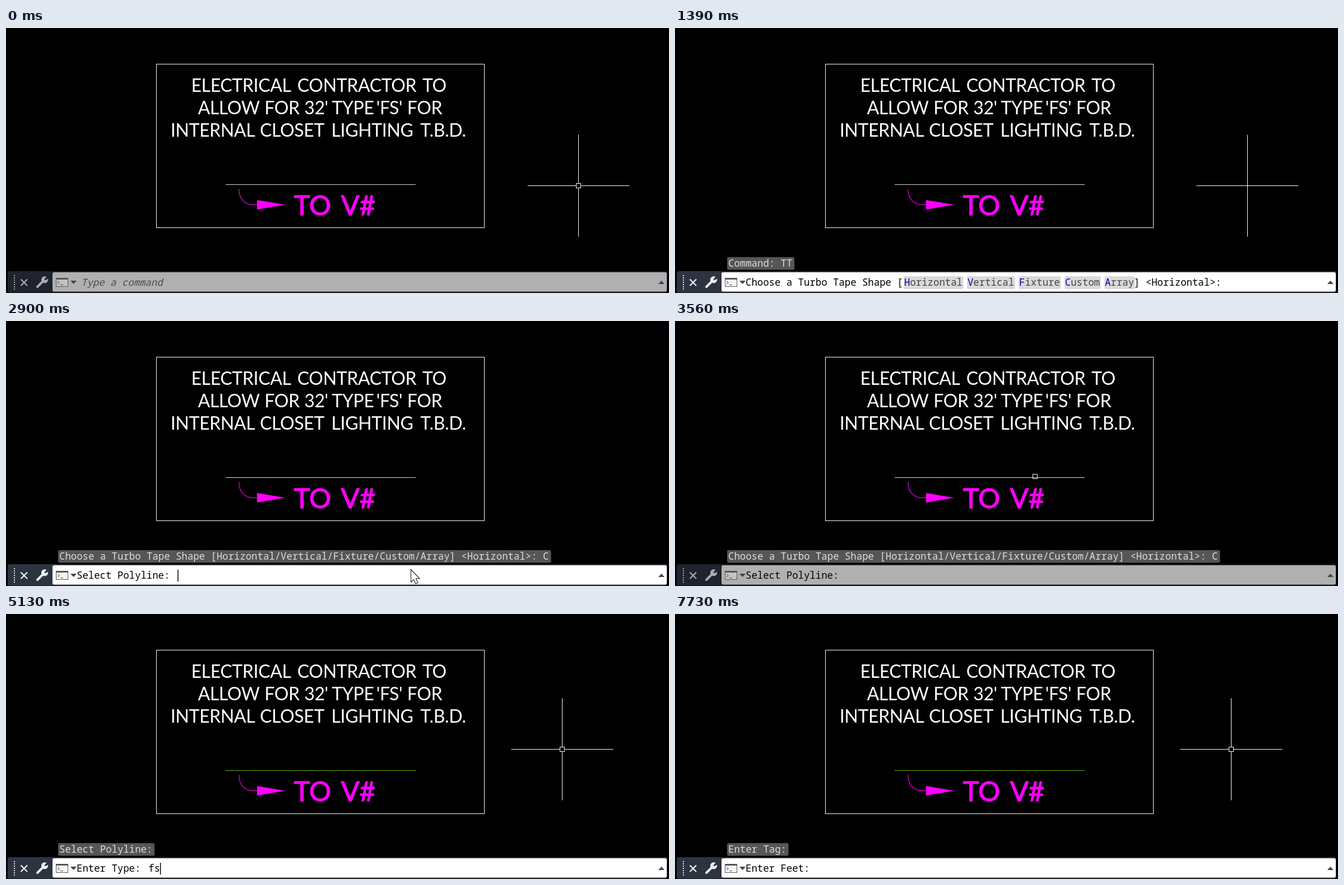
Recreate the animation shown at these times as an HTML page. Size 1183x473 px, loop 8 s.

```html
<!DOCTYPE html>
<html lang="en">
<head>
<meta charset="utf-8">
<title>Command line drawing</title>
<style>
  html, body { margin: 0; width: 100%; height: 100%; overflow: hidden; background: #000; }
  svg { display: block; width: 1183px; height: 473px; }
  .mono { font: 500 17.34px "Noto Sans Mono", monospace; white-space: pre; }
  .hint { font-style: italic; font-weight: 400; }
  .note { font: 32px Lato, sans-serif; letter-spacing: -.35px; fill: #fff; text-anchor: middle; }
  .tag { font: 48.8px Lato, sans-serif; fill: #f0f; stroke: #f0f; stroke-width: 1.3; text-anchor: middle; }
  .thin { fill: none; stroke: #fff; stroke-width: 1; }
  #bar { --frame: #1e232d; --field: #b0b0b0; --glyph: #a9abae; --chip: #959595; --chipText: #333; }
  #bar.active { --frame: #2d3441; --field: #fff; --glyph: #eceef0; --chip: #dadada; --chipText: #444; }
  .frame { fill: var(--frame); }
  .field { fill: var(--field); }
  .glyph { stroke: var(--glyph); fill: none; }
  .hidden { display: none; }
</style>
</head>
<body>
<svg viewBox="0 0 1183 473">
  <rect width="1183" height="473"/>
  <rect class="thin" x="268.5" y="64.5" width="585" height="292"/>
  <g id="notes"></g>
  <path id="polyline" d="M392 279.5H731"/>
  <path d="M416 287V291A24.5 24.5 0 0 0 440.5 315.5H449" fill="none" stroke="#f0f" stroke-width="1.1"/>
  <path d="M448 307L498 315.5L448 324Z" fill="#f0f"/>

  <g id="cross">
    <path id="arms" class="thin"/>
    <rect id="pick" class="thin" x="-4" y="-4" width="8" height="8"/>
  </g>

  <g id="popup">
    <rect x="83" y="366" width="454" height="68" fill="#272d3a"/>
    <rect x="83" y="402" width="454" height="32" fill="#465061"/>
    <path d="M89.5 383.5h4v4h-4zM94 385.5h11M105.5 382.5h6v6h-6z" fill="none" stroke="#d5d8dc"/>
    <text class="mono" x="117.5" y="391.5" fill="#f0f0f0">TT</text>
    <circle cx="489.5" cy="386" r="10.7" fill="#f4f4f4"/>
    <text x="489.5" y="392" text-anchor="middle" font-family="Open Sans, sans-serif" font-weight="700" font-size="17" fill="#272d3a">?</text>
    <g fill="none" stroke="#2c87c9" stroke-width="1.5">
      <circle cx="517" cy="385" r="9.7"/>
      <ellipse cx="517" cy="385" rx="4.6" ry="9.7"/>
      <path d="M517 375V395M507 385H527M509 380H525M509 390H525"/>
    </g>
    <circle cx="522" cy="390" r="4" fill="#272d3a" stroke="#8d949e" stroke-width="1.4"/>
    <path d="M525 393l4 4" stroke="#8d949e" stroke-width="1.8"/>
    <rect x="90" y="406" width="22" height="22" fill="#fff"/>
    <text x="118" y="426" font-family="Noto Sans, sans-serif" font-weight="700" font-size="18.5" fill="#d2d5da">Layer: CDL-A-LTG-ATTRIBUTE</text>
  </g>

  <g id="history">
    <rect id="historyBox" x="93" y="409" height="22.5" rx="3" fill="#565656"/>
    <text id="historyText" class="mono" x="95" y="426" fill="#dcdcdc"></text>
  </g>

  <g id="bar">
    <rect class="frame" x="3" y="434" width="1177" height="38.5" rx="4"/>
    <rect class="field" x="83" y="436" width="1096" height="34.5" rx="3"/>
    <path class="glyph" d="M15 441V467" stroke-width="2" stroke-dasharray="2 2"/>
    <path class="glyph" d="M26.5 448.5L38 460M38 448.5L26.5 460" stroke-width="2.3"/>
    <path class="glyph" d="M56 462L67 451" stroke-width="4" stroke-linecap="round"/>
    <path class="glyph" d="M70.5 444.5A5 5 0 1 0 74 449.5L69.5 451.5L67 448.5Z" stroke-width="2.2" style="fill:var(--glyph)"/>
    <rect x="89.5" y="446.5" width="21" height="15" fill="#e4e4e4" fill-opacity=".35" stroke="#555"/>
    <path d="M89 447.5H111" stroke="#555" stroke-width="3"/>
    <path d="M92 452l3.5 2.5l-3.5 2.5M97 458.5h5" fill="none" stroke="#444"/>
    <path d="M115 451H126L120.5 457Z" fill="#444"/>
    <path d="M1164 457H1175L1169.5 451Z" fill="#444"/>
    <text id="placeholder" class="mono hint" x="134" y="460" fill="#4d4d4d">Type a command</text>
    <text id="prompt" class="mono" x="126" y="460"></text>
    <g id="options"></g>
    <text id="input" class="mono" y="460"></text>
    <rect id="caret" y="444" width="1.5" height="21"/>
  </g>

  <path id="arrow" d="M0 0V22.5L5 18L8.6 25.5L12.4 23.7L8.9 16.3H15.5Z" fill="#fff" stroke="#222" stroke-width="1.1"/>
</svg>
<script>
const LOOP = 8000, CHAR = 10.404, STEP = 82.5, BAR_TOP = 434;
const PROMPT_X = 126, INPUT_GAP = 3.2;
const CHOOSE = "Choose a Turbo Tape Shape [";
const OPTIONS = ["Horizontal", "Vertical", "Fixture", "Custom", "Array"];
const TAIL = "] <Horizontal>:", TAIL_X = 819;
const $ = id => document.getElementById(id);

function add(parent, name, attrs, text = "") {
  const el = document.createElementNS("http://www.w3.org/2000/svg", name);
  for (const key in attrs) el.setAttribute(key, attrs[key]);
  el.textContent = text;
  return parent.appendChild(el);
}

// Each word is centred on its own point.
const words = (y, list, cls = "note") =>
  list.forEach(([text, x]) => add($("notes"), "text", { x, y, class: cls }, text));
words(114, [["ELECTRICAL", 419.5], ["CONTRACTOR", 626], ["TO", 764.5]]);
words(154, [["ALLOW", 397.5], ["FOR", 492.5], ["32'", 553.5], ["TYPE", 619], ["'FS'", 684], ["FOR", 747]]);
words(194, [["INTERNAL", 369], ["CLOSET", 510.5], ["LIGHTING", 653.5], ["T.B.D.", 780]]);
words(334, [["TO", 547], ["V#", 628.5]], "tag");

let chipX = 408;
for (const name of OPTIONS) {
  const width = name.length * CHAR;
  add($("options"), "rect", { x: chipX, y: 443, width: width + 2.4, height: 23, rx: 3, style: "fill:var(--chip)" });
  const label = add($("options"), "text", { x: chipX + 1, y: 460, class: "mono", style: "fill:var(--chipText)" });
  add(label, "tspan", { style: "fill:#0000a8" }, name[0]);
  add(label, "tspan", {}, name.slice(1));
  chipX += width + 8.9;
}
add($("options"), "text", { x: TAIL_X, y: 460, class: "mono" }, TAIL);

// Every entry changes only the fields it names.
const STATES = [
  [0, { active: false, idle: true, prompt: "", input: "", caret: false, history: "", popup: false, arms: true, pick: true, green: false }],
  [160, { active: true, idle: false, input: "t", caret: true }],
  [240, { input: "tt" }],
  [820, { popup: true, caret: false }],
  [1230, { popup: false, input: "" }],
  [1310, { prompt: CHOOSE, history: "Command: TT", pick: false }],
  [1490, { caret: true }],
  [1990, { active: false, caret: false }],
  [2820, { prompt: "Select Polyline: ", caret: true, arms: false, pick: true,
    history: "Choose a Turbo Tape Shape [Horizontal/Vertical/Fixture/Custom/Array] <Horizontal>: C" }],
  [3230, { caret: false }],
  [3890, { prompt: "Enter Type: ", history: "Select Polyline:", arms: true, green: true }],
  [4970, { active: true, input: "f" }],
  [5050, { input: "fs" }],
  [5130, { caret: true }],
  [5710, { caret: false }],
  [6060, { prompt: "Enter Tag: ", input: "", history: "Enter Type: fs" }],
  [6140, { caret: true }],
  [6720, { caret: false }],
  [7140, { prompt: "Enter Feet: ", history: "Enter Tag:" }],
  [7230, { caret: true }],
  [7730, { caret: false }]
];

// Pointer moves: start, end, from, to.
const MOVES = [
  [1990, 2070, [1021.5, 281.5], [1017.5, 281.5]],
  [2070, 2650, [1017.5, 281.5], [722, 443.5]],
  [2900, 3560, [722, 443.5], [642.5, 277.5]],
  [4140, 4560, [642.5, 277.5], [992.5, 241.5]]
];

function pointer(t) {
  let at = MOVES[0][2];
  for (const [start, end, from, to] of MOVES) {
    if (t < start) break;
    const stepped = Math.floor((t - start) / STEP) * STEP;
    const s = t >= end ? 1 : Math.min(1, stepped / (end - start));
    const p = s * s * (3 - 2 * s);
    at = from.map((v, i) => Math.floor(v + (to[i] - v) * p) + .5);
  }
  return at;
}

const show = (id, on) => $(id).classList.toggle("hidden", !on);

function render(t) {
  const s = {};
  for (const [start, change] of STATES) if (t >= start) Object.assign(s, change);
  const [x, y] = pointer(t);
  const overBar = y > BAR_TOP;
  const choosing = s.prompt === CHOOSE;

  $("bar").classList.toggle("active", s.active || overBar);
  show("placeholder", s.idle);
  show("popup", s.popup);
  show("options", choosing);
  show("history", s.history);
  show("caret", s.caret && (s.active || overBar));
  show("cross", !overBar);
  show("arrow", overBar);
  show("arms", s.arms);
  show("pick", s.pick);

  $("polyline").setAttribute("stroke", s.green ? "#6cb010" : "#d8d8d8");
  $("arms").setAttribute("d", s.pick
    ? "M-91 0H-4M4 0H91M0 -91V-4M0 4V91"
    : "M-91 0H91M0 -91V91");
  $("cross").setAttribute("transform", `translate(${x} ${y})`);
  $("arrow").setAttribute("transform", `translate(${x} ${y})`);

  $("historyText").textContent = s.history;
  $("historyBox").setAttribute("width", s.history.length * CHAR + 5.6);
  $("prompt").textContent = s.prompt;
  const promptEnd = choosing
    ? TAIL_X + (TAIL.length + 1) * CHAR
    : PROMPT_X + s.prompt.length * CHAR;
  const inputX = promptEnd + INPUT_GAP;
  $("input").textContent = s.input;
  $("input").setAttribute("x", inputX);
  $("caret").setAttribute("x", inputX + s.input.length * CHAR);
}

const began = performance.now();
function tick() {
  render((performance.now() - began) % LOOP);
  requestAnimationFrame(tick);
}
tick();
</script>
</body>
</html>
```
